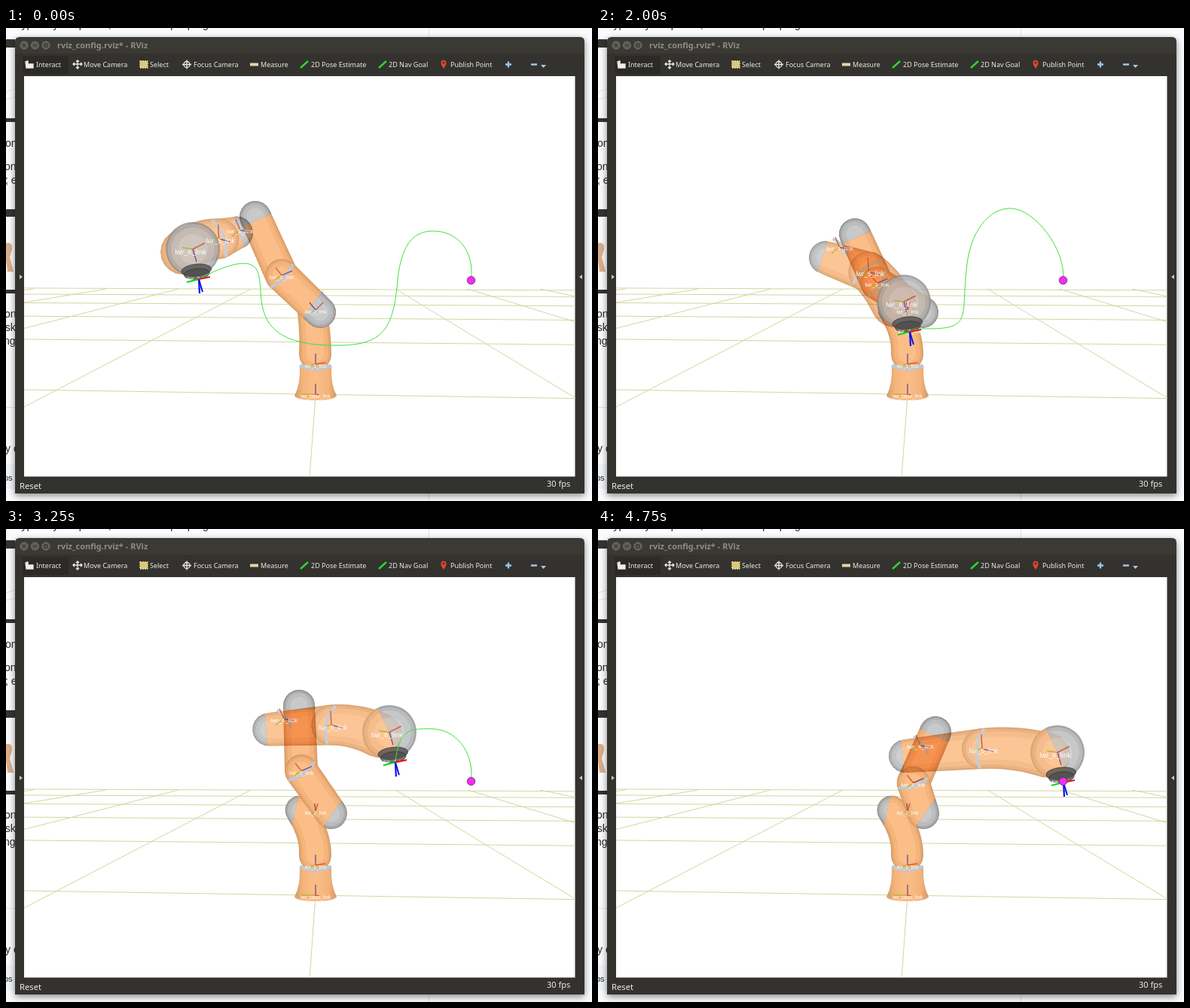
An HTML page for the animation above (5000 ms loop, 778 by 629 pixels).

```html
<!DOCTYPE html>
<html lang="en">
<head>
<meta charset="utf-8">
<title>Robot arm view</title>
<style>
  html, body { margin: 0; width: 100%; height: 100%; overflow: hidden; background: #fafbfc; }
  svg { display: block; width: 100vw; height: 100vh; }
  .ui { font-family: "Noto Sans", "Open Sans", sans-serif; }
  .page { font: 14px "Liberation Sans", Arial, sans-serif; fill: #24292e; }
  .label { font-family: "Liberation Sans", Arial, sans-serif; fill: #fff; text-anchor: middle; }
  .glass { mix-blend-mode: multiply; opacity: .85; }
  .window { filter: drop-shadow(0 3px 5px rgba(0, 0, 0, .45)); }
</style>
</head>
<body>
<svg viewBox="0 0 778 629" preserveAspectRatio="none">
  <defs>
    <linearGradient id="shine">
      <stop stop-color="#d3965f"/><stop offset=".2" stop-color="#f4b176"/><stop offset=".5" stop-color="#fbbb82"/>
      <stop offset=".8" stop-color="#f4b176"/><stop offset="1" stop-color="#d3965f"/>
    </linearGradient>
  </defs>
  <rect width="778" height="629" fill="#fafbfc"/>
  <g class="page">
    <path d="M561.5 0V629M0 504.5H12" stroke="#dfe2e5"/>
    <text x="14" y="0">'typed by the parser, a small sample prog.</text>
    <path d="M0 15H12V26H0ZM0 120H12V125H0ZM0 241H12V251H0ZM0 348H12V353H0Z" fill="#35342f"/>
    <path d="M0 85L12 81M0 95L12 92" stroke="#e3e6cc"/>
    <path d="M0 286Q9 284 8 294L5 305L10 324H2L0 308Z" fill="#dcae88"/>
    <rect y="580" width="14" height="33" fill="#f0f3f7"/>
    <text x="-1" y="158">om</text><text x="-2" y="189">on</text><text x="-1" y="207">; e</text>
    <text x="-2" y="385">on</text><text x="-9" y="403">ask</text><text x="-3" y="421">ng</text>
    <text x="-1" y="564">y c</text><text x="-3" y="602" font-size="11">ps</text>
  </g>
  <path class="window" d="M12 619V18Q12 12 18 12H762Q768 12 768 18V619Z" fill="#3a3934"/>
  <path d="M12 34H768V619H12Z" fill="#33322e"/>
  <rect x="22" y="37" width="61" height="24" rx="3" fill="#2b2a27"/>
  <g fill="#5d5b55" stroke="#77756f">
    <circle cx="24" cy="23" r="5"/><circle cx="38.5" cy="23" r="5"/><circle cx="53" cy="23" r="5"/>
    <path d="M22 21l4 4m0-4l-4 4M36 23h5M51 21h4v4h-4z" stroke="#32312d"/>
  </g>
  <g class="ui" id="bar" font-size="9" fill="#eeece6">
    <text x="68" y="27" font-size="11" font-weight="700" fill="#8f8c85">rviz_config.rviz* - RViz</text>
    <text x="18" y="613" font-size="11.2">Reset</text>
    <text x="718" y="610" font-size="11">30 fps</text>
  </g>
  <g fill="none" stroke="#eeece6" stroke-width="1.3">
    <path d="M26 45h2v-1h1v4h7v5h-9z" fill="#eeece6"/>
    <path d="M89 48H101M95 43V54M91 46l-2 2 2 2M99 46l2 2-2 2M93 45l2-2 2 2M93 52l2 2 2-2"/>
    <circle cx="240" cy="48.5" r="4"/><path d="M234 48.5H246M240 42.5V54.5"/>
    <rect x="178" y="44" width="10" height="9" fill="#d8c878" stroke="#eee2a0" stroke-dasharray="2 1"/>
    <path d="M324 48.5H335" stroke="#e6d3a0" stroke-width="4"/>
    <path d="M391 53L401 44M495 53L505 44" stroke="#28d92e" stroke-width="2.4"/>
    <path d="M581 54Q576 47 578 44Q581 41 584 44Q586 47 581 54Z" fill="#dd4a2b" stroke="none"/>
    <circle cx="581" cy="46" r="1.5" fill="#6b211a" stroke="none"/>
    <path d="M663 48.5H671M667 44.5V52.5M697 48.5H705" stroke="#9cc6f2" stroke-width="2.4"/>
    <path d="M710 49H717L713.5 53ZM18 328L22 331L18 334ZM765 328L761 331L765 334Z" fill="#c9c6bf" stroke="none"/>
  </g>
  <svg x="24" y="64" width="731.5" height="532.5" viewBox="24 64 731.5 532.5">
    <rect x="24" y="64" width="732" height="533" fill="#fff"/>
    <path id="grid" fill="none" stroke="#d3d6a0"/>
    <g id="scene"></g>
  </svg>
</svg>
<script>
const $ = id => document.getElementById(id);

[['Interact', 40], ['Move Camera', 103], ['Select', 191], ['Focus Camera', 249], ['Measure', 338],
 ['2D Pose Estimate', 405], ['2D Nav Goal', 508], ['Publish Point', 590]].forEach(([name, x]) => {
  $('bar').innerHTML += `<text x="${x}" y="52">${name}</text>`;
});

// Ground grid in perspective, slightly rolled.
function ground() {
  let d = '';
  for (let k = 0; k < 6; k++) {
    const y = 187 / (1 + .589 * k);
    d += `M24 ${300 + y * .968}L756 ${300 + y * 1.03}`;
  }
  for (let k = -4; k <= 4; k++) {
    const far = 421 + 96 * k, near = 411 + 345 * k;
    d += `M${far} 347L${2 * near - far} ${627 + 10 * k}`;
  }
  return d;
}
$('grid').setAttribute('d', ground());

// Key points: step, x, y
const toolPath = [[0, 256, 334], [3, 352, 300], [5, 382, 361], [8, 414, 404],
                  [12, 505, 346], [15, 536, 235], [17, 592, 262], [19, 618, 337]];
const elbowPath = [[0, 311, 269], [3, 337, 253], [8, 321, 292], [15, 391, 243], [19, 428, 288]];
const shoulder = [411, 378], goal = [617.5, 335.5];
const orange = ['#d3965f', '#e8a56a', '#f4b176', '#fbbb82'];
const grey = ['#8d8e8f', '#a8a9aa', '#b9babb', '#c6c7c8'];
const shrink = [1, .93, .8, .55];

const add = (p, x, y) => [p[0] + x, p[1] + y];
const lerp = (a, b, t) => [a[0] + (b[0] - a[0]) * t, a[1] + (b[1] - a[1]) * t];
const angle = (a, b) => Math.atan2(b[1] - a[1], b[0] - a[0]);
const polar = (p, r, a) => add(p, r * Math.cos(a), r * Math.sin(a));
const pt = p => p[0].toFixed(1) + ' ' + p[1].toFixed(1);

// Smooth path through key points, at rest at both ends.
function track(keys, s) {
  const last = keys.length - 1;
  if (s >= keys[last][0]) return keys[last].slice(1);
  const i = keys.findIndex((k, n) => s < keys[n + 1][0]);
  const h = keys[i + 1][0] - keys[i][0], u = (s - keys[i][0]) / h;
  const slope = (j, c) => j && j < last
    ? (keys[j + 1][c] - keys[j - 1][c]) / (keys[j + 1][0] - keys[j - 1][0]) : 0;
  return keys[i].map((a, c) => {
    const b = keys[i + 1][c], w = u * u * (3 - 2 * u);
    return a + (b - a) * w + h * u * (1 - u) * (slope(i, c) * (1 - u) - slope(i + 1, c) * u);
  }).slice(1);
}

// Outline of a round-ended tube along a quadratic curve.
function tube(a, b, r0, r1, ctrl = lerp(a, b, .5)) {
  const left = [], right = [], n = 10;
  for (let i = 0; i <= n; i++) {
    const t = i / n, p = lerp(a, ctrl, t), q = lerp(ctrl, b, t);
    const dir = angle(p, q), r = r0 + (r1 - r0) * t, c = lerp(p, q, t);
    left.push(polar(c, r, dir - Math.PI / 2));
    right.unshift(polar(c, r, dir + Math.PI / 2));
  }
  const round = (p, r, dir) => Array.from({ length: 11 }, (_, i) => polar(p, r, dir + Math.PI * (i / 10 - .5)));
  return [...left, ...round(b, r1, angle(ctrl, b)), ...right, ...round(a, r0, angle(ctrl, a))];
}
const disc = (p, r) => Array.from({ length: 40 }, (_, i) => polar(p, r, i * Math.PI / 20));

// Keeps the part of a polygon on the far side of a line through q.
function clip(poly, q, dir) {
  const side = p => (p[0] - q[0]) * Math.cos(dir) + (p[1] - q[1]) * Math.sin(dir);
  return poly.flatMap((p, i) => {
    const next = poly[(i + 1) % poly.length], d = side(p), e = side(next), out = d >= 0 ? [p] : [];
    if (d * e < 0) out.push(lerp(p, next, d / (d - e)));
    return out;
  });
}
const fill = (poly, color) => poly.length ? `<path d="M${poly.map(pt).join('L')}Z" fill="${color}"/>` : '';
const shade = (outline, colors) => shrink.map((k, i) => fill(outline(k), colors[i])).join('');
function limb(a, b, r0, r1, cap, ctrl) {
  const outline = k => tube(a, b, r0 * k, r1 * k, ctrl);
  return shade(outline, orange) + (cap ? shade(k => clip(outline(k), ...cap), grey) : '');
}
function band(p, r, dir, bulge) {
  const a = polar(p, r, dir + Math.PI / 2), b = polar(p, r, dir - Math.PI / 2);
  return `<path d="M${pt(a)}Q${pt(polar(p, bulge * 2, dir))} ${pt(b)}" fill="none" stroke="#bcc5ce" stroke-width="4"/>`;
}
const line = (p, [x, y], color, w) => `<path d="M${pt(p)}l${x} ${y}" stroke="${color}" stroke-width="${w}"/>`;
const axes = (p, red, green, blue) =>
  line(p, green, '#a8b322', 1.4) + line(p, blue, '#6b3c86', 1.4) + line(p, red, '#cf4a25', 1.4);
const label = (p, text, size) =>
  `<text class="label" x="${p[0].toFixed(1)}" y="${(p[1] + 2).toFixed(1)}" font-size="${size}">lwr_${text}_link</text>`;
const bend = (a, b, c) => `C${pt(a)} ${pt(b)} ${pt(c)}`;

// Remaining plan: a wave that is pulled up and left, then relaxes.
function curve(s, tool) {
  if (s > 18) return '';
  const x = (s / 6) ** 2, pull = x * Math.exp(1 - x), [tx, ty] = tool;
  const low = [440, 422 - 27 * pull], rise = [519 - 37 * pull, 345 - 25 * pull];
  const peak = [567 - 24 * pull, 270 - 37 * pull];
  const toGoal = bend(add(peak, 32, 0), [622, 295], goal);
  const toPeak = bend(add(rise, 4, -55), add(peak, -28, 0), peak) + toGoal;
  const toRise = bend(add(low, 55, 0), add(rise, -6, 60), rise) + toPeak;
  let d = 'M' + pt(tool);
  if (s < 2) d += bend([tx + 25, ty - 14], [303, 313], [315, 313]) + bend([370, 313], add(low, -155, 2), low) + toRise;
  else if (s < 9) d += bend([tx + 8, ty + .7 * (low[1] - ty)], [tx + .2 * (low[0] - tx), low[1]], low) + toRise;
  else if (s < 12) d += bend([tx + .6 * (rise[0] - tx), ty], add(rise, -4, (ty - rise[1]) / 2), rise) + toPeak;
  else if (s < 15) d += bend([tx + 5, ty - 45], add(peak, -28, 0), peak) + toGoal;
  else d += bend([tx + .45 * (goal[0] - tx), ty], [627, 288], goal);
  return `<path d="${d}" fill="none" stroke="#3fe03f"/>`;
}

function scene(s) {
  const tool = track(toolPath, s), elbow = track(elbowPath, s), wrist = add(tool, -8, -40);
  const swing = Math.exp(-s / 3), open = 1 - .75 * swing;
  const ring3 = lerp(shoulder, elbow, .45), ring5 = lerp(elbow, wrist, .45), neck = add(wrist, -13, 4);
  const hip = [390 + 16 * swing, 374], knee = [432 - 15 * swing, 378];
  const crown = add(elbow, 20, -18), side = add(elbow, -20 * open, 14 * open);
  const up = angle(ring3, crown), back = angle(ring5, side), tilt = -.45, r = 36;
  const cut = polar(wrist, -r * Math.min(1, Math.max(0, 3 - s / 4)), tilt);
  const base = 'M383 489Q391 474 390 450Q411 458 432 450Q431 474 439 489Q435 495 411 495Q387 495 383 489Z';

  const arm = `<g opacity=".95"><path d="${base}" fill="url(#shine)"/>` +
    limb([410.5, 434], hip, 21.5, 19.5, [add(hip, -6 - 32 * swing, 0), 3.35], [411, 404]) +
    '<path d="M390 449Q411 457 432 449" fill="none" stroke="#bcc5ce" stroke-width="5"/>' +
    limb(ring3, crown, 22, 21, [polar(crown, -5, up), up]) +
    limb(ring3, knee, 22, 21, [polar(knee, 2 - 16 * swing, .6), .6]) +
    band(ring3, 21, angle(ring3, knee), 5) + '</g>' +
    '<g class="glass">' + limb(side, ring5, 22, 27, [polar(side, 4, back), back]) +
    limb(ring5, neck, 27, r - 6, null, add(lerp(ring5, neck, .5), 0, -8)) +
    shade(k => clip(disc(wrist, r * k), cut, tilt + Math.PI), orange) +
    band(ring5, 26, angle(ring5, neck), -7) + band(elbow, 15, angle(side, crown), 4) + '</g>' +
    '<g opacity=".8">' + shade(k => clip(disc(wrist, r * k), cut, tilt), grey) + '</g>';

  const plate = `<g transform="translate(${pt(add(tool, -3, -10))}) rotate(-6)" stroke="#333" stroke-width=".7" fill="#4d4d4d" fill-opacity=".78">` +
    '<ellipse cy="-2" rx="20" ry="8"/><ellipse cy="3" rx="17" ry="7"/></g>';

  const marks = '<g opacity=".85">' +
    axes([411, 487], [5, 1], [-19, 0], [0, -14]) + axes([411, 447], [13, -2], [-9, 2], [0, -14]) +
    axes([411, 375], [3 + 7 * swing, -10], [-4, 2], [-1 - 7 * swing, -10]) +
    axes(ring3, [-8, -10], [-9, 6], [14, -6]) + axes(elbow, [-6, -14], [-11, 8], [14, 2]) +
    axes(ring5, [-1, -19], [-13, 3], [15, 4]) + axes(wrist, [16, -8], [-14, -2], [5, 17]) + '</g>' +
    label([411, 490], 'base', 6.5) + label([411, 450], 1, 6.5) + label(shoulder, 2, 6.5) +
    label(add(ring3, 0, 3), 3, 7.2) + label(add(elbow, 0, 2), 4, 8) +
    label(add(ring5, 2, 4), 5, 8.6) + label(add(wrist, -3, 5), 6, 9.4) + label(tool, 7, 7);

  const tip = line(tool, [-16, 4], '#12d412', 2.2) + line(tool, [1, 19], '#1010e8', 2.2) +
    line(tool, [5, 17], '#1010e8', 2) + line(tool, [15, -3], '#e01616', 2.2);
  const target = `<circle cx="${goal[0]}" cy="${goal[1]}" r="5.3" fill="#f52cf2" stroke="#5d2a5c" stroke-width=".8"/>`;
  return arm + plate + marks + curve(s, tool) + tip + target;
}

let shown = -1;
const start = performance.now();
function tick(now) {
  const step = Math.floor(Math.max(0, now - start) % 5000 / 250);
  if (step !== shown) $('scene').innerHTML = scene(shown = step);
  requestAnimationFrame(tick);
}
tick(start);
</script>
</body>
</html>
```
